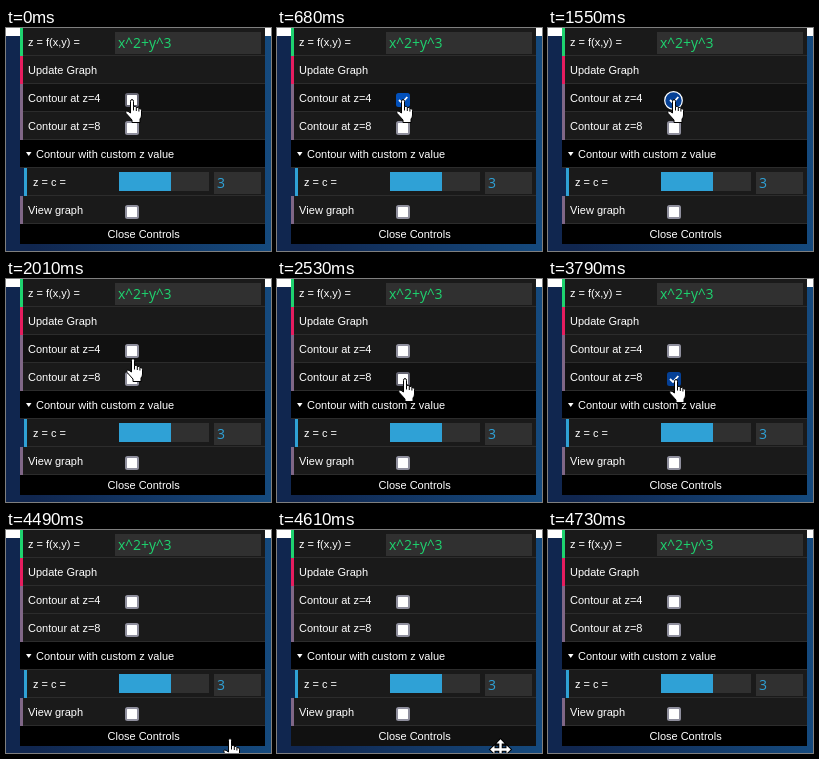
Recreate the animation shown at these times as an HTML page with a canvas. Size 265 by 223 pixels, loop 5.29 s.

```html
<!DOCTYPE html>
<html lang="en">
<head>
<meta charset="utf-8">
<title>Graph controls</title>
<style>
html, body { margin: 0; width: 100%; height: 100%; overflow: hidden; background: #10264f; }
canvas { display: block; width: 265px; height: 223px; }
</style>
</head>
<body>
<canvas id="stage" width="265" height="223"></canvas>
<script>
const ctx = document.getElementById('stage').getContext('2d');
ctx.fontKerning = 'none';
const LOOP = 5290;
const LEFT = 14, RIGHT = 259, ROW = 28;
const GREEN = '#1ed36f', RED = '#e61d5f', PURPLE = '#806787', BLUE = '#2fa1d6';
const LABEL = '11px "Liberation Sans", Arial, sans-serif';
const INPUT = '14px "Open Sans", "Noto Sans", sans-serif';

const backdrop = ctx.createLinearGradient(0, 0, 265, 0);
backdrop.addColorStop(0.1, '#10264f');
backdrop.addColorStop(1, '#154a7e');

// [start time, value], each held until the next entry
const hand = [
  [0, [119, 71]], [2010, [120, 79]], [2130, [122, 90]], [2250, [123, 95]],
  [2530, [121, 99]], [3080, [121, 100]], [4370, [178, 165]], [4490, [217, 208]],
  [4610, null]
];
const boxFour = [[0, 'hover'], [680, 'checked'], [1550, 'pressed'], [1700, 'hover'], [2010, 'off']];
const boxEight = [[0, 'off'], [2250, 'hover'], [2830, 'checked'], [3790, 'pressed'], [3910, 'hover'], [4370, 'off']];
const clickRing = [[0, null], [1550, [125.5, 72.5]], [1700, null], [2680, [127.5, 100.5]], [2830, null]];
const leaving = [[0, false], [4610, true], [4730, false]];

const at = (steps, t) => steps.filter(s => s[0] <= t).pop()[1];

const handShape = new Path2D(
  'M5.5 2.5Q5.5 .5 7 .5Q8.5 .5 8.5 2.5V7.5Q10.8 6.6 11.3 8.5' +
  'Q13.3 7.8 13.9 9.6Q16.5 9 16.5 11.5V16Q16.5 18.5 15 20V23.5H7V21' +
  'L1.2 14.5Q0 12.6 1.3 12Q2.6 11.6 5.5 14Z');
const handLines = new Path2D('M8.5 7.5V11.5M11.3 8.5V12M13.9 9.6V12.5');

function rect(x, y, w, h, color) {
  ctx.fillStyle = color;
  ctx.fillRect(x, y, w, h);
}

function text(str, x, y, color = '#fff', font = LABEL) {
  ctx.font = font;
  ctx.fillStyle = color;
  ctx.fillText(str, x, y);
}

function row(index, label, color, { indent = 0, hover = false } = {}) {
  const y = index * ROW, x = LEFT + indent;
  rect(x, y, RIGHT - x, ROW - 1, hover ? '#111' : '#1a1a1a');
  rect(x, y + ROW - 1, RIGHT - x, 1, '#2c2c2c');
  rect(x, y, 3, ROW, color);
  text(label, x + (indent ? 9 : 8), y + 18);
}

function checkbox(y, state) {
  const on = state === 'checked' || state === 'pressed';
  const fill = on ? (state === 'pressed' ? '#054096' : '#0250bb') : '#fff';
  const edge = on ? fill : state === 'hover' ? '#676774' : '#8f8f9d';
  ctx.beginPath();
  ctx.roundRect(120, y + 1, 12, 12, 1.5);
  ctx.fillStyle = fill;
  ctx.fill();
  ctx.strokeStyle = edge;
  ctx.lineWidth = 2;
  ctx.stroke();
  if (!on) return;
  ctx.beginPath();
  ctx.moveTo(122, y + 7);
  ctx.lineTo(125, y + 10);
  ctx.lineTo(130.3, y + 4);
  ctx.strokeStyle = '#fff';
  ctx.lineWidth = 1.8;
  ctx.stroke();
}

function disc([x, y], style, radius) {
  ctx.beginPath();
  ctx.arc(x, y, radius, 0, Math.PI * 2);
  ctx[style]();
}

function drawHand([x, y]) {
  ctx.save();
  ctx.translate(x, y);
  ctx.lineWidth = 1;
  ctx.fillStyle = '#fff';
  ctx.strokeStyle = '#000';
  ctx.fill(handShape);
  ctx.stroke(handShape);
  ctx.stroke(handLines);
  ctx.restore();
}

function drawMove(x, y) {
  ctx.save();
  ctx.translate(x, y);
  ctx.beginPath();
  for (let i = 0; i < 4; i++) {
    ctx.lineTo(-1.2, -1.2);
    ctx.lineTo(-1.2, -6);
    ctx.lineTo(-4, -6);
    ctx.lineTo(0, -10.3);
    ctx.lineTo(4, -6);
    ctx.lineTo(1.2, -6);
    ctx.rotate(Math.PI / 2);
  }
  ctx.closePath();
  ctx.lineWidth = 2;
  ctx.strokeStyle = '#000';
  ctx.stroke();
  ctx.fillStyle = '#fff';
  ctx.fill();
  ctx.restore();
}

function drawPanel(hoverRow, hoverClose) {
  rect(0, 0, 265, 223, backdrop);
  rect(0, 0, 265, 8, '#fff');

  row(0, 'z = f(x,y) =', GREEN);
  rect(109, 4, 146, 22, '#303030');
  text('x^2+y^3', 112, 20, GREEN, INPUT);

  row(1, 'Update Graph', RED);
  row(2, 'Contour at z=4', PURPLE, { hover: hoverRow === 2 });
  row(3, 'Contour at z=8', PURPLE, { hover: hoverRow === 3 });

  rect(LEFT, 4 * ROW, RIGHT - LEFT, ROW - 1, '#000');
  rect(LEFT, 5 * ROW - 1, RIGHT - LEFT, 1, '#2c2c2c');
  ctx.fillStyle = '#fff';
  ctx.fill(new Path2D('M20 124H25.5L22.75 128Z'));
  text('Contour with custom z value', 30, 130);

  row(5, 'z = c =', BLUE, { indent: 4 });
  rect(113, 144, 90, 19, '#303030');
  rect(113, 144, 52, 19, BLUE);
  rect(208, 144, 47, 22, '#303030');
  text('3', 211, 160, BLUE, INPUT);

  row(6, 'View graph', PURPLE);
  checkbox(177, 'off');

  rect(LEFT, 196, RIGHT - LEFT, 20, hoverClose ? '#111' : '#000');
  text('Close Controls', 101.5, 210);
}

function draw(t) {
  const leave = at(leaving, t), ring = at(clickRing, t), pointer = at(hand, t);
  drawPanel(pointer && Math.floor(pointer[1] / ROW), leave);
  if (ring) {
    ctx.fillStyle = '#0a4596';
    disc(ring, 'fill', 9);
  }
  checkbox(65, at(boxFour, t));
  checkbox(93, at(boxEight, t));
  if (ring) {
    ctx.strokeStyle = '#fff';
    ctx.lineWidth = 1.2;
    disc(ring, 'stroke', 8.8);
  }
  if (pointer) drawHand(pointer);
  if (leave) drawMove(223.5, 219.5);
}

const start = performance.now();
function tick() {
  draw((performance.now() - start) % LOOP);
  requestAnimationFrame(tick);
}
tick();
</script>
</body>
</html>
```
